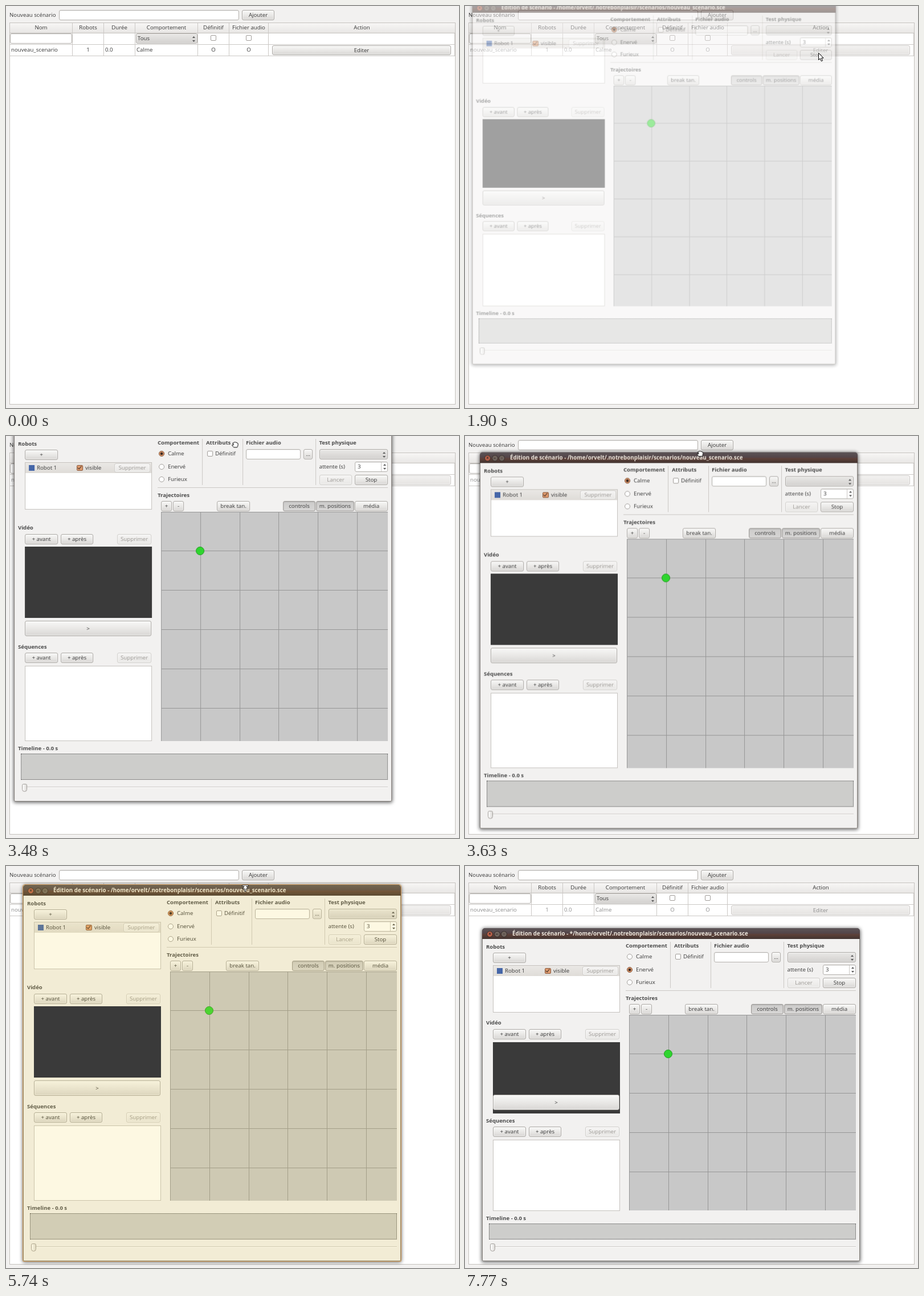
An HTML page for the animation above (8 s loop, 795x705 px).

```html
<!DOCTYPE html>
<html lang="fr">
<head>
<meta charset="utf-8">
<title>Édition de scénario</title>
<style>
html, body { margin: 0; width: 100%; height: 100%; overflow: hidden; background: #f2f1f0; }
body { position: relative; font: 9.7px/16px "Open Sans", "Noto Sans", sans-serif; color: #383838; }
div { position: absolute; box-sizing: border-box; }
.layer { left: 0; top: 0; width: 795px; height: 705px; }
.t { white-space: nowrap; height: 16px; }
.c { text-align: center; }
.b { font-weight: 700; font-size: 9.55px; color: #4a4a4a; }
.title { font-weight: 700; font-size: 9.76px; color: #eee8de; }
.btn { display: flex; align-items: center; justify-content: center; white-space: nowrap;
  border: 1px solid #aba8a4; border-radius: 3px; background: linear-gradient(#f8f8f7, #ebeae8 45%, #d9d7d5);
  box-shadow: inset 0 0 0 1px #ffffff70; }
.off { color: #9a9793; border-color: #d0cecb; background: linear-gradient(#f5f4f3, #e9e8e6); }
.on { border-color: #9d9a97; background: linear-gradient(#cdcccb, #d6d5d4); box-shadow: inset 0 1px 2px #0002; }
.combo { background: linear-gradient(#e9e8e6, #d3d1cf); }
.input { background: #fff; border: 1px solid #b4b1ad; border-radius: 3px; box-shadow: inset 0 1px 1px #0001; }
.list { background: #fff; border: 1px solid #c5c2be; }
.line { background: #cbc8c5; }
.mesh { background: #969696; }
.row { background: linear-gradient(#eae8e5, #dfdcd8); }
.chk { background: #fff; border: 1px solid #a19d99; border-radius: 2px; }
.tick { background: #dd9a6e; border-color: #8a5a3e; }
.tick::after { content: ""; position: absolute; left: 2px; top: -1px; width: 3px; height: 6px;
  border: solid #3b2a22; border-width: 0 1.5px 1.5px 0; transform: rotate(40deg); }
.radio { background: #fff; border: 1px solid #a19d99; border-radius: 50%; }
.full { border-color: #8a5a3e; background: radial-gradient(#3b2a22 0 2px, #d8946a 2.7px); }
.ud::before, .ud::after { content: ""; position: absolute; left: 0; width: 5px; height: 3px; background: #555; }
.ud::before { top: 0; clip-path: polygon(50% 0, 100% 100%, 0 100%); }
.ud::after { bottom: 0; clip-path: polygon(0 0, 100% 0, 50% 100%); }
.head { background: linear-gradient(#f7f6f5, #e8e6e4); border-bottom: 1px solid #c4c1bd; }
.frame { background: #f2f1f0; border: 1px solid #827d78; border-radius: 5px 5px 2px 2px;
  box-shadow: 0 1px 6px 1px rgba(0, 0, 0, .6); }
.bar { background: linear-gradient(#5d5557, #54464a 45%, #5d4038 60%, #413431); border-radius: 5px 5px 0 0; }
.knob { display: flex; align-items: center; justify-content: center; border: 1px solid #332d2a;
  border-radius: 50%; background: #70645d; color: #2f2926; font: 700 8px/8px "Open Sans", sans-serif; }
.close { background: #b8604a; }
.video { background: #3a3a3a; }
.grid { background: #c8c8c8; overflow: hidden; }
.dot { background: #2fd52f; border: 1px solid #249a24; border-radius: 50%; }
.time { background: #cdcdcb; border: 1px dotted #4a4a4a; }
.thumb { background: linear-gradient(90deg, #fff, #dddbd8); border: 1px solid #a19d99; border-radius: 3px 3px 5px 5px; }
.tint { border: 1.5px solid #cf9a5c; border-radius: 4px 4px 2px 2px; background: rgba(240, 205, 60, .15); }

/* motion */
.grey { animation: grey 8s step-end infinite; }
.press { animation: press 8s step-end infinite; }
.early { animation: early 8s step-end infinite; }
.late { animation: late 8s step-end infinite; }
.fit { animation: fit 8s step-end infinite; }
.drag { animation: drag 8s linear infinite; }
.pop { transform-origin: 361.5px 363px; animation: pop 8s step-end infinite; }
.tint { animation: tint 8s linear infinite, tintShow 8s step-end infinite; }
.cursor { left: 0; top: 0; animation: move 8s linear infinite; }
.cursor svg { position: absolute; left: -12px; top: -12px; overflow: visible; }
.arrow { animation: arrow 8s step-end infinite; }
.hand { animation: hand 8s step-end infinite; }
.size { animation: size 8s step-end infinite; }

@keyframes grey { 0% { color: #383838 } 23.75%, 100% { color: #8c8c8c } }
@keyframes press {
  19.375% { background: linear-gradient(#c9c8c6, #d6d5d3) }
  20% { background: linear-gradient(#f8f8f7, #ebeae8 45%, #d9d7d5); color: #383838; border-color: #aba8a4 }
  23.75%, 100% { background: linear-gradient(#f2f1f0, #e6e4e2); color: #8c8c8c; border-color: #cdcac7 }
}
@keyframes early { 0% { opacity: 1 } 91.5%, 100% { opacity: 0 } }
@keyframes late { 0% { opacity: 0 } 91.5%, 100% { opacity: 1 } }
@keyframes fit { 79.875%, 100% { translate: 0 var(--dy); height: var(--h); z-index: var(--z) } }
@keyframes drag {
  0%, 41% { transform: translate(-30px, -52px) }
  43.5% { transform: translate(-16px, -52px) }
  43.99% { transform: translate(-13px, -52px) }
  44% { transform: translate(-13px, -15px) }
  46%, 100% { transform: translate(0, 0) }
}
@keyframes pop {
  0% { opacity: 0; transform: scale(.962) }
  23.75% { opacity: .48; transform: scale(.962) }
  24.375% { opacity: .8; transform: scale(.985) }
  25.125%, 100% { opacity: 1; transform: none }
}
@keyframes tint {
  0%, 71.75% { top: 32px; height: 662px; animation-timing-function: ease-in-out }
  79.2%, 100% { top: 108px; height: 586px }
}
@keyframes tintShow { 0% { opacity: 0 } 71.75% { opacity: 1 } 79.875%, 100% { opacity: 0 } }
@keyframes move {
  0%, 6.25% { transform: translate(800px, 408px); animation-timing-function: cubic-bezier(.3, .2, .5, 1) }
  15.5% { transform: translate(611px, 75px) }
  16.625%, 29.375% { transform: translate(620px, 82px) }
  29.875% { transform: translate(626px, 80px) }
  34.25%, 41% { transform: translate(388px, -20px) }
  43.5% { transform: translate(402px, 15px) }
  46%, 47.99% { transform: translate(416px, 36px) }
  48% { transform: translate(412px, 27px) }
  49.875%, 51.5% { transform: translate(411px, 26px) }
  53.625%, 56.3% { transform: translate(414px, 32px) }
  56.375%, 60.3% { transform: translate(415px, 33px) }
  60.375% { transform: translate(412px, 31px) }
  61%, 65.74% { transform: translate(414px, 32px) }
  65.75%, 71.75% { transform: translate(420px, 39px); animation-timing-function: ease-in-out }
  79.2%, 80.5% { transform: translate(418px, 114px) }
  81.75% { transform: translate(396px, 113px); animation-timing-function: ease-in-out }
  87.375%, 91.8% { transform: translate(288px, 178px); animation-timing-function: ease-in }
  97.125%, 100% { transform: translate(108px, -20px) }
}
@keyframes arrow { 0% { opacity: 1 } 41% { opacity: 0 } 48% { opacity: 1 } 65.75% { opacity: 0 } 81.2%, 100% { opacity: 1 } }
@keyframes hand { 0% { opacity: 0 } 41% { opacity: 1 } 48%, 100% { opacity: 0 } }
@keyframes size { 0% { opacity: 0 } 65.75% { opacity: 1 } 81.2%, 100% { opacity: 0 } }
</style>
</head>
<body>
<div class="layer" id="main"></div>
<div class="layer drag"><div class="layer pop" id="dialog"></div></div>
<div class="cursor">
  <svg width="24" height="24" viewBox="-12 -12 24 24" fill="#fff" stroke="#000" stroke-linejoin="round">
    <path class="arrow" d="M.5 .5V12.5L3.3 10L5.3 14.8L7.5 13.8L5.5 9.2H9.2Z"/>
    <path class="hand" d="M-4.5 -1.5Q-4.5 -3.5 -2.6 -3.2Q-2 -5 -.4 -4Q.8 -5 1.8 -3.6Q3.5 -4.2 3.8 -2.6Q5.5 -2.6 5.2 -.5Q5 3 3.5 4.8H-2.4Q-5.5 2 -5.3 .6Q-5 -.4 -3 1V-2"/>
    <path class="size" d="M-5.5 -5.5H5.5V-3.2H1.8L4.8 .8H1.2V5.5H-1.2V.8H-4.8L-1.8 -3.2H-5.5Z" stroke-width=".8"/>
  </svg>
</div>
<script>
const $ = id => document.getElementById(id);

function add(parent, cls, x, y, w, h, text = '') {
  const el = document.createElement('div');
  el.className = cls;
  Object.assign(el.style, { left: x + 'px', top: y + 'px', width: w + 'px', height: h + 'px' });
  el.textContent = text;
  parent.append(el);
  return el;
}

function label(parent, x, y, text, cls = '') {
  const el = add(parent, 't ' + cls, x, y - 8.5, 0, 16, text);
  el.style.width = 'max-content';
  return el;
}

const centred = (parent, x, y, text, cls = '') => add(parent, 't c ' + cls, x - 60, y - 8.5, 120, 16, text);

// Marks how an element shifts and shrinks when the dialog is resized.
function fit(el, dy, h = el.style.height, z = 'auto') {
  el.classList.add('fit');
  el.style.setProperty('--dy', dy + 'px');
  el.style.setProperty('--h', h);
  el.style.setProperty('--z', z);
  return el;
}

function buildMain(p) {
  label(p, 6, 16, 'Nouveau scénario');
  add(p, 'input', 93, 7, 316, 18);
  add(p, 'btn', 414, 7, 57, 18, 'Ajouter');
  add(p, 'list', 6, 29, 783, 670);
  add(p, 'head', 7, 30, 781, 18);
  const edges = [6, 116, 171, 226, 336, 391, 460, 788];
  const names = ['Nom', 'Robots', 'Durée', 'Comportement', 'Définitif', 'Fichier audio', 'Action'];
  names.forEach((name, i) => {
    centred(p, (edges[i] + edges[i + 1]) / 2 + .5, 38.5, name);
    if (i) add(p, 'line', edges[i], 30, 1, 58);
  });
  add(p, 'line', 7, 67, 781, 1);
  add(p, 'line', 7, 87, 781, 1);
  add(p, 'line', 787, 48, 1, 40);
  add(p, 'input', 7, 48, 109, 18);
  add(p, 'btn combo', 228, 48, 108, 18);
  label(p, 231, 57.5, 'Tous');
  add(p, 'ud', 327, 53, 5, 10);
  add(p, 'chk', 359, 51, 10, 10);
  add(p, 'chk', 421, 51, 10, 10);
  label(p, 9, 77.5, 'nouveau_scenario', 'grey');
  centred(p, 144, 77.5, '1', 'grey');
  label(p, 174, 77.5, '0.0', 'grey');
  label(p, 229, 77.5, 'Calme', 'grey');
  centred(p, 364, 77.5, 'O', 'grey');
  centred(p, 426, 77.5, 'O', 'grey');
  add(p, 'btn press', 467, 69, 314, 17, 'Editer');
}

function buildDialog(p) {
  const group = (dy, z) => fit(add(p, '', 0, 0, 0, 0), dy, '0px', z);
  const trio = (g, y) => {
    add(g, 'btn', 49, y, 58, 18, '+ avant');
    add(g, 'btn', 112, y, 57, 18, '+ après');
    add(g, 'btn off', 211, y, 60, 18, 'Supprimer');
  };

  fit(add(p, 'frame', 30, 33, 663, 660), 76, '584px');

  const top = group(76);
  add(top, 'bar', 30, 33, 663, 19);
  ['×', '–', '▫'].forEach((mark, i) => add(top, 'knob' + (i ? '' : ' close'), 38 + i * 12.5, 37.5, 11, 11, mark));
  const path = '/home/orvelt/.notrebonplaisir/scenarios/nouveau_scenario.sce';
  label(top, 83, 43.5, 'Édition de scénario - ' + path, 'title early');
  label(top, 83, 43.5, 'Édition de scénario - *' + path, 'title late');

  label(top, 37, 66, 'Robots', 'b');
  add(top, 'btn', 49, 76, 58, 18, '+');
  add(top, 'list', 49, 98, 223, 83);
  add(top, 'row', 50, 99, 221, 18);
  add(top, '', 56, 103, 10, 10).style.background = '#4566a8';
  label(top, 70, 108.5, 'Robot 1');
  add(top, 'chk tick', 140, 103, 11, 10);
  label(top, 155, 108, 'visible');
  add(top, 'btn off', 206, 100, 63, 16, 'Supprimer');

  label(top, 282, 64.5, 'Comportement', 'b');
  ['Calme', 'Enervé', 'Furieux'].forEach((mood, i) => {
    const y = 83.5 + i * 22.5;
    add(top, 'radio', 284, y - 5.5, 10, 10);
    if (i < 2) add(top, 'radio full ' + ['early', 'late'][i], 284, y - 5.5, 10, 10);
    label(top, 300, y, mood);
  });
  for (const x of [360, 431, 559]) add(top, 'line', x, 57, 1, 81);
  add(top, 'line', 282, 142, 404, 1);

  label(top, 367, 64.5, 'Attributs', 'b');
  add(top, 'chk', 369, 78, 10, 10);
  label(top, 383, 83.5, 'Définitif');
  label(top, 437, 64.5, 'Fichier audio', 'b');
  add(top, 'input', 437, 75, 96, 18);
  add(top, 'btn', 538, 75, 16, 18, '...');

  label(top, 565.5, 64.5, 'Test physique', 'b');
  add(top, 'btn combo', 566, 75, 120, 18);
  add(top, 'ud', 677, 80, 5, 10);
  label(top, 565.5, 106.5, 'attente (s)');
  add(top, 'input', 628, 97, 58, 18);
  add(top, 'line', 674, 98, 1, 16);
  add(top, 'ud', 678, 101, 5, 10);
  label(top, 633, 106.5, '3');
  add(top, 'btn off', 566, 120, 57, 18, 'Lancer');
  add(top, 'btn', 628, 120, 58, 18, 'Stop');

  label(top, 282, 156, 'Trajectoires', 'b');
  add(top, 'btn', 288, 166, 19, 18, '+');
  add(top, 'btn', 309, 166, 19, 18, '-');
  add(top, 'btn', 386, 166, 58, 18, 'break tan.');
  add(top, 'btn on', 502, 166, 57, 18, 'controls');
  add(top, 'btn on', 560, 166, 67, 18, 'm. positions');
  add(top, 'btn', 628, 166, 58, 18, 'média');

  const grid = fit(add(top, 'grid', 288, 185, 398, 402), 0, '343px');
  for (let i = 0; i < 6; i++) {
    const at = Math.floor(i * 68.8);
    add(grid, 'mesh', Math.round(i * 68.8), 0, 1, 402);
    add(grid, 'mesh', 0, at, 398, 1);
  }
  add(grid, 'dot', 61, 61, 15, 15);

  const clips = group(62);
  label(clips, 37, 213.5, 'Vidéo', 'b');
  trio(clips, 224);

  const screen = group(63, 1);
  screen.style.zIndex = 1;
  add(screen, 'video', 49, 246, 223, 125);

  const play = group(25, 2);
  add(play, 'btn', 49, 376, 222, 27, '>');

  const steps = group(25);
  label(steps, 37, 422, 'Séquences', 'b');
  trio(steps, 432);
  fit(add(steps, 'list', 49, 455, 223, 132), 0, '125px');

  fit(label(p, 37, 600, 'Timeline - 0.0 s', 'b'), 18);
  fit(add(p, 'time', 42, 609, 644, 46), 18, '28px');
  const rail = add(p, 'line', 44, 667, 642, 2);
  rail.style.borderBottom = '1px solid #fff';
  add(p, 'thumb', 44, 662, 9, 14);
  add(p, 'tint', 29, 32, 665, 662);
}

buildMain($('main'));
buildDialog($('dialog'));
</script>
</body>
</html>
```
